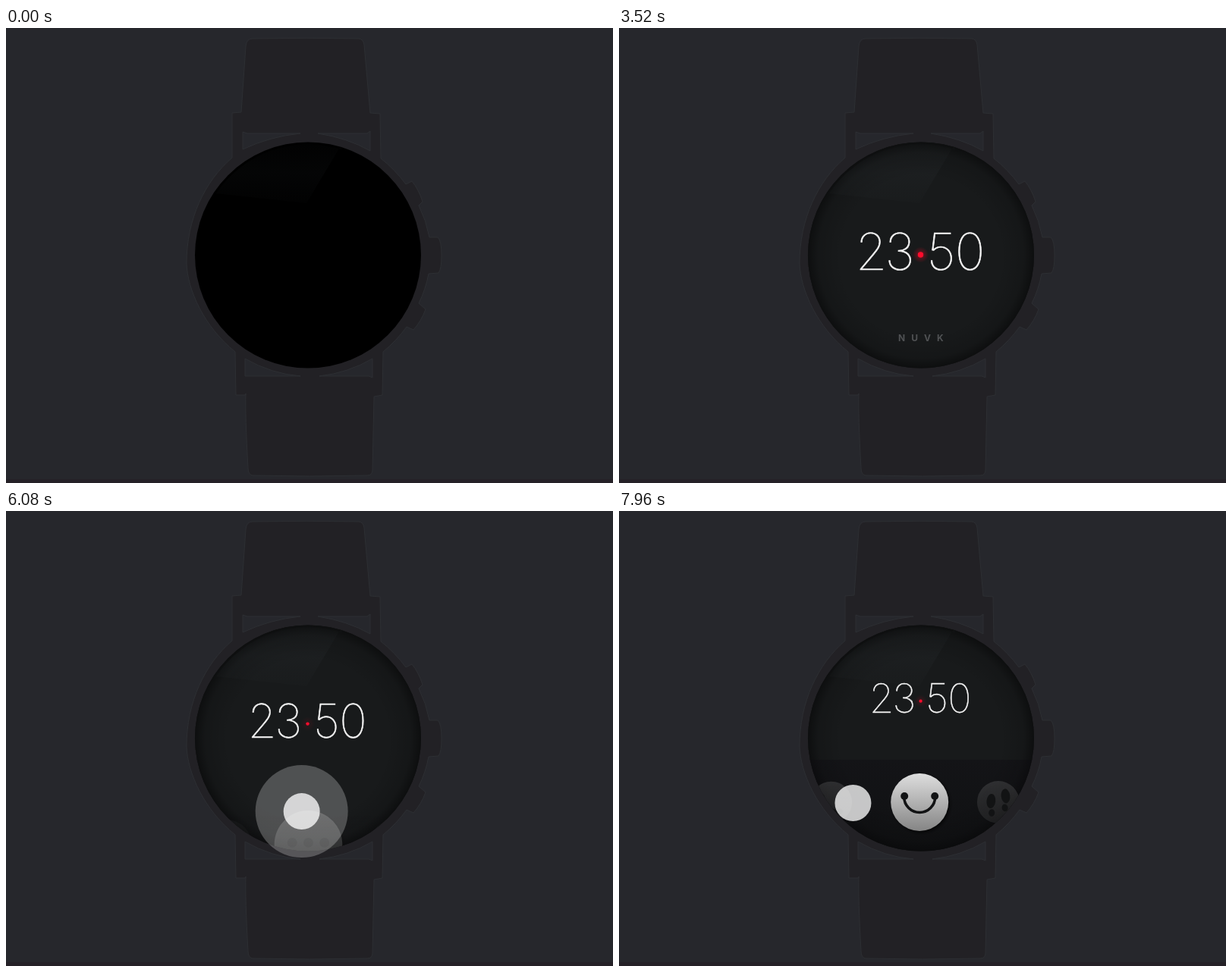
These frames come from a looping animation (800x600 px, 8000 ms). An HTML page with a canvas:

```html
<!DOCTYPE html>
<html lang="en">
<head>
<meta charset="utf-8">
<title>Watch face</title>
<style>
  html, body { margin: 0; width: 100%; height: 100%; overflow: hidden; background: #26272c; }
  canvas { display: block; width: 800px; height: 600px; }
</style>
</head>
<body>
<canvas id="stage" width="800" height="600"></canvas>
<script>
const ctx = document.getElementById('stage').getContext('2d');
const LOOP = 8000, TAU = Math.PI * 2;
const CX = 398, CY = 299.5, R = 149;
const DARK = '#121314';
const SANS = 'Inter, Roboto, "Liberation Sans", sans-serif';

const clamp = v => Math.max(0, Math.min(1, v));
const ramp = (t, a, b) => clamp((t - a) / (b - a));
const smooth = u => u * u * (3 - 2 * u);
const outCubic = u => 1 - (1 - u) ** 3;
const mix = (a, b, u) => a + (b - a) * u;

function disc(x, y, r, fill) {
  ctx.beginPath();
  ctx.arc(x, y, Math.max(0, r), 0, TAU);
  ctx.fillStyle = fill;
  ctx.fill();
}

function oval(x, y, rx, ry, turn) {
  ctx.beginPath();
  ctx.ellipse(x, y, rx, ry, turn, 0, TAU);
  ctx.fill();
}

function layer(alpha, draw) {
  if (alpha <= 0) return;
  ctx.save();
  ctx.globalAlpha *= alpha;
  draw();
  ctx.restore();
}

// ---------- Watch body ----------
const body = new Path2D(`M298 112 L310 111 L316 24 Q317 14 325 14 Q397 12.5 465 14
  Q471 15 472 22 L480 112 L493 113 L494 172 Q512 186 527 206 L535 202 Q544 213 549 229
  L544 234 Q554 254 558 276 L569 276 Q574 280 574 300 Q574 318 570 323 L557 324
  Q553 345 544 363 L553 371 Q547 387 537 398 L528 394 Q515 412 497 427 L496 484 L485 486
  L483 583 Q483 590 476 590 Q400 592 325 590 Q319 589 319 580 Q315 510 316 482 L315 484
  L303 484 L302 427 C261 394 239 345 238 310 C238 252 262 202 298 171 Z`);
const gaps = new Path2D(`M312 137 L312 160 Q348 143 388 139 L318 139 Z
  M411 139 Q450 145 480 162 L480 136 L476 139 Z
  M315 436 Q350 456 388 459 L315 459 Z
  M413 459 Q450 455 483 436 L483 461 L478 459 Z`);

function drawBody() {
  ctx.fillStyle = '#26272c';
  ctx.fillRect(0, 0, 800, 600);
  ctx.fillStyle = '#252127';
  ctx.fillRect(0, 595, 800, 5);
  ctx.lineWidth = 1;
  ctx.strokeStyle = '#2d2f33';
  ctx.fillStyle = '#222125';
  ctx.fill(body);
  ctx.stroke(body);
  ctx.fillStyle = '#26272c';
  ctx.fill(gaps);
  ctx.stroke(gaps);
  disc(CX, CY, R, '#000');
}

function drawLight(t) {
  const u = ramp(t, 1110, 2010);
  if (!u) return;
  const r = 164 * (1 - (1 - u) ** 1.7);
  const g = ctx.createRadialGradient(CX, CY, Math.max(0, r - 13), CX, CY, r);
  g.addColorStop(0, '#181a1b');
  g.addColorStop(1, 'rgba(24,26,27,0)');
  layer(mix(0.75, 1, u), () => disc(CX, CY, r, g));
  const edge = ctx.createRadialGradient(CX, CY + 2, 105, CX, CY, R);
  edge.addColorStop(0, 'rgba(0,0,0,0)');
  edge.addColorStop(0.7, 'rgba(0,0,0,.14)');
  edge.addColorStop(1, 'rgba(0,0,0,.45)');
  disc(CX, CY, R, edge);
}

function drawGlare() {
  const g = ctx.createLinearGradient(0, 150, 0, 232);
  g.addColorStop(0, 'rgba(190,215,235,.008)');
  g.addColorStop(0.5, 'rgba(190,215,235,.024)');
  g.addColorStop(1, 'rgba(190,215,235,.006)');
  ctx.beginPath();
  ctx.moveTo(442, 154);
  ctx.lineTo(396, 231);
  ctx.lineTo(276, 218);
  ctx.arc(CX, CY, R - 3, Math.PI * 1.19, Math.PI * 1.6);
  ctx.closePath();
  ctx.fillStyle = g;
  ctx.fill();
}

// ---------- Clock ----------
function drawClock(t, p) {
  ctx.save();
  ctx.translate(CX, mix(295, 247.5, p));
  const s = mix(1, 0.79, p);
  ctx.scale(s, s);
  ctx.font = `100 67px ${SANS}`;
  ctx.textAlign = 'center';
  ctx.fillStyle = ctx.strokeStyle = '#f4f4f4';
  ctx.lineWidth = 0.7;
  [['2', -65.5], ['3', -28], ['5', 27], ['0', 64.5]].forEach(([digit, x], i) => {
    const late = i > 1 ? 80 : 0;
    layer(ramp(t, 1200 + late, 2060 + late), () => {
      ctx.fillText(digit, x, 24);
      ctx.strokeText(digit, x, 24);
    });
  });
  const beat = 0.5 + 0.5 * Math.cos(TAU * (t - 600) / 1000);
  layer(ramp(t, 270, 600), () => {
    const g = ctx.createRadialGradient(-0.5, 4, 2, -0.5, 4, 10.5);
    g.addColorStop(0, `rgba(255,10,40,${0.08 + 0.3 * beat})`);
    g.addColorStop(1, 'rgba(255,10,40,0)');
    disc(-0.5, 4, 10.5, g);
    disc(-0.5, 4, mix(2.4, 3.8, beat), '#ff0c2c');
  });
  ctx.restore();
}

function drawMark(t, p) {
  const morph = smooth(ramp(t, 3700, 4400));
  layer(ramp(t, 2360, 3000) * (1 - morph), () => {
    ctx.font = `700 12px ${SANS}`;
    ctx.textAlign = 'left';
    ctx.letterSpacing = '8px';
    ctx.fillStyle = '#505254';
    ctx.fillText('NUVK', 368, 413);
    ctx.letterSpacing = '0px';
  });
  layer(morph * (1 - ramp(p, 0.02, 0.3)), () => {
    ctx.fillStyle = '#4d4e50';
    ctx.beginPath();
    ctx.roundRect(367, 407 + 40 * p, 63, 4.5, 2);
    ctx.fill();
  });
}

// ---------- Icons, drawn around 0,0 with a radius of 38 ----------
function drawPlate(tail) {
  const g = ctx.createLinearGradient(0, -38, 0, 38);
  g.addColorStop(0, '#dedede');
  g.addColorStop(1, '#858585');
  ctx.shadowColor = 'rgba(0,0,0,.7)';
  ctx.shadowBlur = 4;
  ctx.shadowOffsetX = ctx.shadowOffsetY = 2;
  ctx.beginPath();
  ctx.arc(0, 0, 38, 1, TAU + (tail ? 0.45 : 1));
  if (tail) {
    ctx.quadraticCurveTo(28, 28, 33, 35);
    ctx.quadraticCurveTo(27, 36, 20.5, 32);
  }
  ctx.fillStyle = g;
  ctx.fill();
}

function gear() {
  for (let i = 0; i < 8; i++) {
    ctx.save();
    ctx.rotate(i * TAU / 8);
    ctx.fillRect(-4.5, -25, 9, 12);
    ctx.restore();
  }
  ctx.lineWidth = 9;
  ctx.beginPath();
  ctx.arc(0, 0, 14.5, 0, TAU);
  ctx.stroke();
  disc(0, 0, 5, DARK);
}

function message() {
  [-18, 0, 18].forEach(x => disc(x, -2, 5.4, DARK));
}

function phone() {
  ctx.lineWidth = 6;
  ctx.lineCap = 'round';
  ctx.beginPath();
  ctx.moveTo(-18, -8);
  ctx.quadraticCurveTo(-12, 14, 14, 18);
  ctx.stroke();
  oval(-17, -9, 5, 6, -0.3);
  oval(15, 17, 6, 5, -0.3);
}

function smiley() {
  [-20, 20].forEach(x => disc(x, -8, 5, DARK));
  ctx.lineWidth = 3.6;
  ctx.beginPath();
  ctx.arc(0, -7, 20.5, 0, Math.PI);
  ctx.stroke();
}

function steps() {
  [[-13, 3, 0.12], [13, -6, -0.12]].forEach(([x, y, turn]) => {
    oval(x, y - 5, 8, 13, turn);
    oval(x + turn * 10, y + 16, 5.5, 6.5, turn);
  });
}

const icons = [gear, message, phone, smiley, steps];

function drawIcons(t, p) {
  if (p < 0.2) return;
  const drift = mix(-0.02, 0, ramp(t, 6720, 7000));
  const pos = t < 7410 ? drift : 2.055 * outCubic(ramp(t, 7410, 8020));
  const y = 474 - 90 * p;
  const show = ramp(p, 0.25, 0.85);

  layer(p * p, () => {
    const top = 328 + 120 * (1 - p);
    const g = ctx.createLinearGradient(0, top, 0, top + 110);
    g.addColorStop(0, 'rgba(12,10,16,.38)');
    g.addColorStop(1, 'rgba(8,8,10,.5)');
    ctx.fillStyle = g;
    ctx.fillRect(240, top, 320, 140);
  });

  icons.forEach((glyph, i) => {
    const d = i - 1 - pos, far = Math.abs(d);
    if (far > 1.8) return;
    const focus = clamp((1 - far) * 1.08);
    ctx.save();
    ctx.translate(CX + Math.sign(d) * 110 * far ** 1.4, y);
    const s = mix(0.72, 1, focus) * (49 - 11 * p) / 38;
    ctx.scale(s, s);
    layer(show * mix(0.14, 1, focus * focus), () => drawPlate(glyph === message));
    ctx.fillStyle = ctx.strokeStyle = DARK;
    layer(show, glyph);
    if (glyph === message) drawBadge(t, focus);
    ctx.restore();
  });
}

function drawBadge(t, focus) {
  const u = ramp(t, 6400, 6640);
  const pop = u ? 1 + 2.7 * (u - 1) ** 3 + 1.7 * (u - 1) ** 2 : 0;
  if (pop <= 0) return;
  layer(focus * focus, () => {
    ctx.translate(34.5, -37);
    ctx.scale(pop, pop);
    disc(0, 0, 21.8, '#f5102c');
    ctx.font = '700 38px "Liberation Sans", Arial, sans-serif';
    ctx.textAlign = 'center';
    ctx.fillStyle = '#fff';
    ctx.fillText('3', 0, 14);
  });
}

// ---------- Finger ----------
const linear = u => u;
const moves = [
  [5280, 523, 502, smooth], [5760, 389, 409, smooth], [5975, 389, 409, linear],
  [6600, 393, 333, smooth], [6740, 393, 333, smooth], [7220, 474, 395, smooth],
  [7410, 474, 395, outCubic], [8050, 308, 385, linear]
];

function drawTouch(t) {
  if (t < 5300) return;
  let i = 0;
  while (i < moves.length - 2 && t >= moves[i + 1][0]) i++;
  const [t0, x0, y0, ease] = moves[i], [t1, x1, y1] = moves[i + 1];
  const u = ease(ramp(t, t0, t1));
  const x = mix(x0, x1, u), y = mix(y0, y1, u);
  const press = (a, b, c, d) => smooth(ramp(t, a, b)) * (1 - smooth(ramp(t, c, d)));
  const ring = Math.max(press(5740, 5900, 6160, 6480), press(7220, 7370, 7480, 7740));
  if (ring) layer(ring, () => disc(x, y, mix(24, 61, ring), 'rgba(255,255,255,.24)'));
  layer(ramp(t, 5280, 5480), () => disc(x, y, 24, 'rgba(255,255,255,.76)'));
}

function frame(now) {
  const t = now % LOOP;
  const p = outCubic(ramp(t, 5920, 7010));
  drawBody();
  ctx.save();
  ctx.beginPath();
  ctx.arc(CX, CY, R, 0, TAU);
  ctx.clip();
  drawLight(t);
  drawGlare();
  drawMark(t, p);
  drawIcons(t, p);
  drawClock(t, p);
  ctx.restore();
  drawTouch(t);
}

const start = performance.now();
function tick() {
  frame(performance.now() - start);
  requestAnimationFrame(tick);
}
tick();
</script>
</body>
</html>
```
